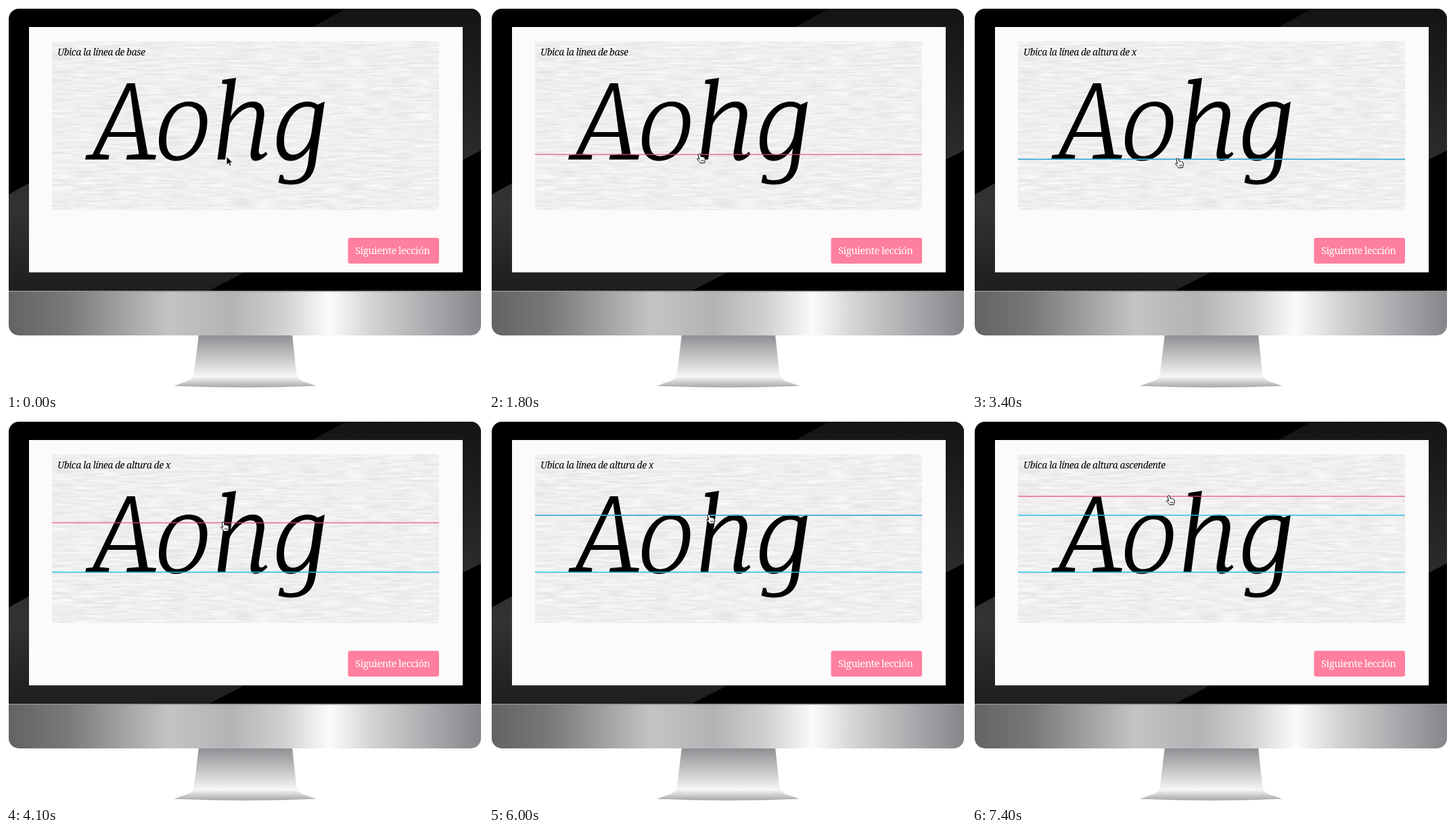
Recreate the animation shown at these times as an HTML page. Size 705 by 568 pixels, loop 8 s.

```html
<!DOCTYPE html>
<html lang="es">
<head>
<meta charset="utf-8">
<title>Anatomía tipográfica</title>
<style>
html, body { margin: 0; width: 100%; height: 100%; overflow: hidden; background: #fff; }
svg { display: block; width: 100vw; height: 100vh; }
text { font-family: "Noto Serif", serif; }
#label { font-size: 14px; font-style: italic; letter-spacing: -.5px; }
#button { font-size: 15px; letter-spacing: -.62px; fill: #fff; }
</style>
</head>
<body>
<svg viewBox="0 0 705 568">
  <defs>
    <linearGradient id="chin">
      <stop offset="0" stop-color="#626365"/>
      <stop offset=".12" stop-color="#77787a"/>
      <stop offset=".34" stop-color="#c3c4c5"/>
      <stop offset=".47" stop-color="#b2b3b5"/>
      <stop offset=".58" stop-color="#cfd0d1"/>
      <stop offset=".68" stop-color="#fbfbfb"/>
      <stop offset=".77" stop-color="#d2d3d4"/>
      <stop offset="1" stop-color="#85868a"/>
    </linearGradient>
    <linearGradient id="stand" x2="0" y2="1">
      <stop offset="0" stop-color="#8c8d90"/>
      <stop offset=".45" stop-color="#c6c7c8"/>
      <stop offset=".8" stop-color="#f6f6f6"/>
      <stop offset="1" stop-color="#a5a6a8"/>
    </linearGradient>
    <linearGradient id="gloss" x2="0" y2="1">
      <stop offset="0" stop-color="#141414"/>
      <stop offset=".7" stop-color="#333"/>
      <stop offset="1" stop-color="#1e1e1e"/>
    </linearGradient>
    <clipPath id="body"><rect x="4" y="4" width="698" height="482" rx="15"/></clipPath>
    <clipPath id="panel"><rect x="68" y="52" width="572" height="249" rx="4"/></clipPath>
    <filter id="paper" x="0" y="0" width="1" height="1" color-interpolation-filters="sRGB">
      <feTurbulence type="fractalNoise" baseFrequency=".03 .3" numOctaves="3" seed="4"/>
      <feColorMatrix values=".13 0 0 0 .877  .13 0 0 0 .868  .13 0 0 0 .875  0 0 0 0 1"/>
    </filter>
  </defs>

  <path fill="url(#stand)" d="M285 484H423L429 540Q430 549 437 553L459 560.500Q353 565 248 560.500L269 553Q277 550 278 541Z"/>
  <g clip-path="url(#body)">
    <rect width="705" height="421"/>
    <path fill="url(#gloss)" d="M4 278L502 4H702V213L300 420H4Z"/>
    <rect x="4" y="420" width="698" height="66" fill="url(#chin)"/>
    <rect x="4" y="420" width="698" height="1.500" fill="#8d8e90"/>
  </g>
  <rect x="34" y="31" width="641" height="362" fill="#fcfafb"/>
  <g clip-path="url(#panel)">
    <rect x="68" y="52" width="572" height="249" filter="url(#paper)"/>
  </g>
  <rect x="505.500" y="342" width="134.500" height="38" rx="3" fill="#ff7f9e"/>
  <text id="button" x="516" y="366">Siguiente lección</text>
  <text id="label" x="76" y="73"></text>

  <g role="img" aria-label="Aohg" fill-rule="evenodd">
    <path d="M179 114H190.500L209.500 219L222 220L220.500 226.500H177.500L179 220L196.500 218.500L192.500 193H150.500L138 218.500L152.500 220L151.500 226.500H117L118.500 220L128 219ZM183.500 124L154 186H191.500Z"/>
    <path d="M270 141C287 141 298 151 297.500 170C297 203 277 228.500 251 228.500C235 228.500 225.500 217 226 198C227 166 245 141 270 141ZM268 148C250 148 238 171 237 197C236.500 213 242 221.500 253 221.500C273 221.500 286 197 286.500 172C286.800 156 281 148 268 148Z"/>
    <path d="M319 114.500L320 109L340 106L332 163C341 149 352 141 365 141C377 141 383 149 381.500 163L374 209C373 216 374 219 377 219C379.500 219 382 217 384 215L386.500 218.500C381 225 374 228.500 369 228.500C362 228.500 360.500 222 362 213L370 165C371.500 154 369 149.500 361.500 149.500C350 149.500 333 167 330.500 176L324 226.500H312.500L327 115.500Z"/>
    <path d="M471 141L457.500 232C454 254 441 263.500 421 263.500C414 263.500 408 262.500 402.500 260.500L405 249L409.500 249.500L411 255.500C414.500 256.800 417.500 257 421 257C436 257 444 249 446.500 231L449 210C441 222 431 228.500 421 228.500C407 228.500 399.500 217 400 199C401 167 421 141 446 141C452 141 456.500 142.500 460.500 145.500ZM456.500 152C453.500 149.500 450 148.500 445.500 148.500C426 148.500 412 172 411 197C410.500 211 415 219.500 424 219.500C436 219.500 449 205 451.500 187Z"/>
  </g>

  <rect id="guide" x="68" width="572" height="1.200" fill="#ea4d72"/>
  <g fill="#25c2e8">
    <rect id="base" x="68" y="225.300" width="572" height="1.500"/>
    <rect id="xheight" x="68" y="141.300" width="572" height="1.500"/>
  </g>
  <path id="arrow" d="M0 0V12.500L3 9.800L5 14.300L7 13.400L5.100 9H9Z" stroke="#fff" stroke-width=".8"/>
  <g id="hand" fill="#fff" stroke="#000" stroke-linejoin="round">
    <path d="M3 1.200C4 .6 5 1 5.300 2L6.300 5.500C7 4.900 8 5 8.400 5.800C9.200 5.200 10 5.500 10.400 6.300C11.300 6 12 6.600 12.100 7.600L12.300 10.500C12.200 12 11.400 13 11.200 14.500L5.200 14.800C4.800 13.300 2.500 11.500 .9 9.300C.3 8.200 1.500 7.500 2.500 8.200L3.700 9.200L2.200 2.600C2 1.900 2.300 1.400 3 1.200Z"/>
    <path d="M6.500 10l.4 2.500M8.300 10l.2 2.500M10 10v2.500" stroke-width=".7"/>
  </g>
</svg>
<script>
const LOOP = 8000, STEP = 100;
const HOVER = 1400, BASE_SET = 3000, X_SET = 6000, LEAVE_X = 6700;

// Pointer stops: time, x, y
const stops = [
  [0, 326, 222], [400, 285, 241], [600, 285, 241], [1000, 292, 233], [1300, 292, 233],
  [1400, 290, 231], [1600, 303, 216], [1800, 307, 219], [2200, 303, 229],
  [2300, 302, 229], [2800, 300, 226], [3600, 300, 226],
  [3800, 305, 208], [4000, 314, 167], [4100, 317, 153], [4300, 318, 148], [4500, 319, 147],
  [4800, 321, 144], [5000, 321, 145], [5200, 321, 145], [5400, 321, 142], [6500, 321, 142],
  [6600, 309, 130], [6800, 297, 119], [7100, 289, 116], [7200, 289, 116],
  [7300, 288, 113], [7400, 287, 114], [LOOP, 287, 114]
];
const $ = id => document.getElementById(id);
const show = (id, on) => $(id).setAttribute("visibility", on ? "visible" : "hidden");
const move = (id, x, y) => $(id).setAttribute("transform", `translate(${x} ${y})`);

function pointerAt(t) {
  const i = stops.findIndex(s => s[0] > t);
  const [t0, x0, y0] = stops[i - 1], [t1, x1, y1] = stops[i];
  const k = (t - t0) / (t1 - t0);
  return [Math.round(x0 + (x1 - x0) * k), Math.round(y0 + (y1 - y0) * k)];
}

function labelAt(t) {
  const goal = t < 3400 ? "base" : t < 6200 ? "altura de x" : "altura ascendente";
  return "Ubica la línea de " + goal;
}

function draw(t) {
  const [x, y] = pointerAt(t);
  const held = t >= X_SET && t < LEAVE_X;
  move("arrow", x, y);
  move("hand", x, y - 2);
  $("guide").setAttribute("y", (held ? 142 : y) - .5);
  show("arrow", t < HOVER);
  show("hand", t >= HOVER);
  show("guide", t >= HOVER);
  show("base", t >= BASE_SET);
  show("xheight", t >= X_SET);
  $("label").textContent = labelAt(t);
}

let last = -1;
function tick() {
  const t = Math.floor(performance.now() % LOOP / STEP) * STEP;
  if (t !== last) draw(last = t);
  requestAnimationFrame(tick);
}
tick();
</script>
</body>
</html>
```
